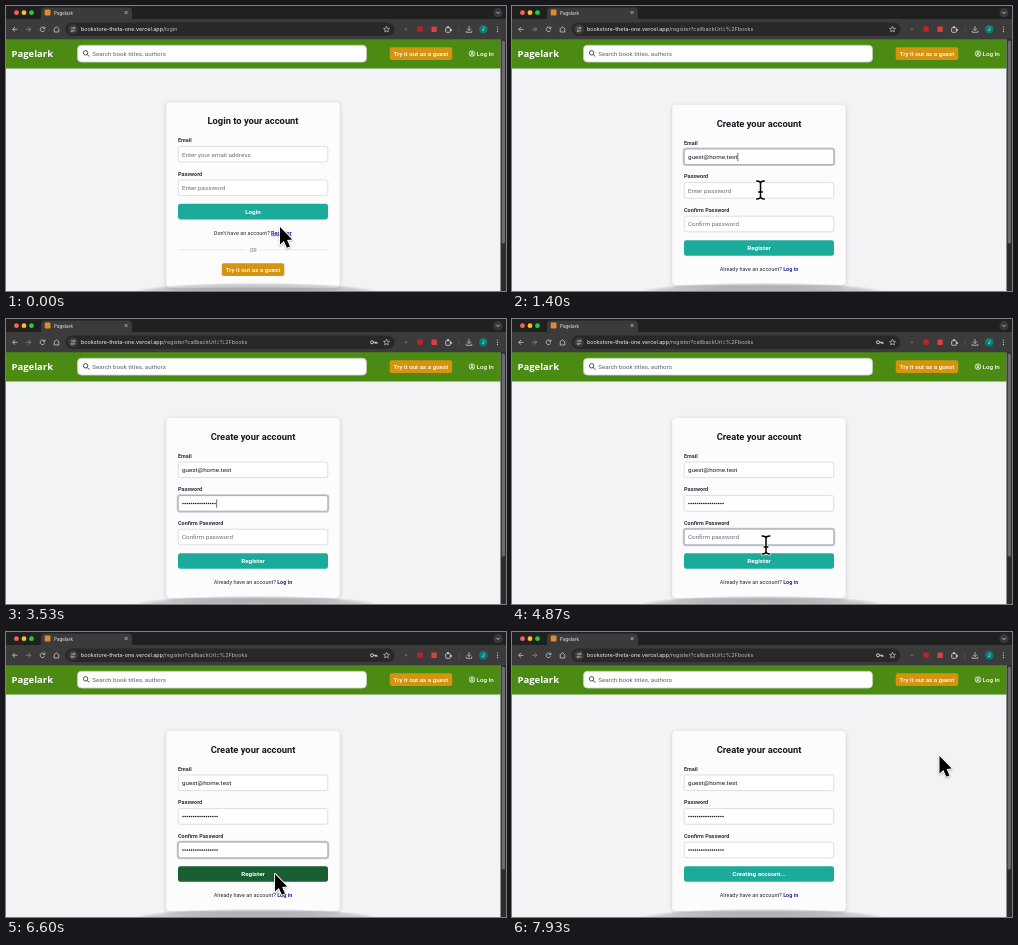
These frames come from a looping animation (500 px wide and 285 px high, 8000 ms). An HTML page with a canvas:

```html
<!DOCTYPE html>
<html lang="en">
<head>
<meta charset="utf-8">
<title>Sign-up demo</title>
<style>
  html, body { margin: 0; width: 100%; height: 100%; overflow: hidden; background: #f2f3f5; }
  canvas { display: block; width: 500px; height: 285px; }
</style>
</head>
<body>
<canvas id="stage"></canvas>
<script>
const W = 500, H = 285, LOOP = 8000;
const canvas = document.getElementById('stage');
const c = canvas.getContext('2d');
const dpr = Math.max(1, window.devicePixelRatio || 1);
canvas.width = W * dpr;
canvas.height = H * dpr;

const UI = 'Inter, "Open Sans", sans-serif';
const PAGE = 'Roboto, "Open Sans", sans-serif';
const BRAND = 'Pagelark';
const EMAIL = 'guest@home.test';
const HOST = 'bookstore-theta-one.vercel.app';
const REGISTER_PATH = '/register?callbackUrl=%2Fbooks';
const MID = 247, DOTS = 17;
const TEAL = '#1caa9b', AMBER = '#d4940f', LINK = '#252a9b', INK = '#14181f';

const T = {
  statusOn: 130, page: 730, email: [820, 1290],
  focusPass: 1530, pass: [1950, 3620],
  focusConfirm: 4560, confirm: [5000, 6060],
  submit: 6720
};

// Pointer keys: time, x, y
const PATH = [
  [0, 274, 221], [120, 274, 221], [480, 251, 151], [1000, 251, 151],
  [1340, 248.5, 184], [3720, 248.5, 184], [4300, 254, 226],
  [6080, 254, 226], [6420, 269, 242], [6920, 269, 242], [7640, 427.5, 124]
];
const HIDDEN = [[T.email[0], 1180], [T.pass[0], 3720], [T.confirm[0], 6090]];

const ramp = (t, [a, b]) => Math.min(1, Math.max(0, (t - a) / (b - a)));
const smooth = p => p * p * (3 - 2 * p);

function pointerAt(t) {
  const next = PATH.findIndex(k => k[0] > t);
  if (next < 0) return PATH[PATH.length - 1].slice(1);
  const a = PATH[next - 1], b = PATH[next];
  const p = smooth(ramp(t, [a[0], b[0]]));
  return [a[1] + (b[1] - a[1]) * p, a[2] + (b[2] - a[2]) * p];
}

function box(x, y, w, h, r, fill, stroke, lw = 0.6) {
  c.beginPath();
  c.roundRect(x, y, w, h, r);
  if (fill) { c.fillStyle = fill; c.fill(); }
  if (stroke) { c.strokeStyle = stroke; c.lineWidth = lw; c.stroke(); }
}

function disc(x, y, r, fill) {
  c.beginPath();
  c.arc(x, y, r, 0, Math.PI * 2);
  c.fillStyle = fill;
  c.fill();
}

function ring(x, y, r, color, lw = 0.8, from = 0, to = Math.PI * 2) {
  c.beginPath();
  c.arc(x, y, r, from, to);
  c.strokeStyle = color;
  c.lineWidth = lw;
  c.stroke();
}

function line(color, lw, ...p) {
  c.beginPath();
  c.moveTo(p[0], p[1]);
  for (let i = 2; i < p.length; i += 2) c.lineTo(p[i], p[i + 1]);
  c.strokeStyle = color;
  c.lineWidth = lw;
  c.stroke();
}

function text(s, x, y, size, color, { weight = 400, font = PAGE, align = 'left' } = {}) {
  c.font = `${weight} ${size}px ${font}`;
  c.textAlign = align;
  c.fillStyle = color;
  c.fillText(s, x, y);
  return c.measureText(s).width;
}

function drawTabs() {
  box(0, 0, W, 14, 0, '#1f2020');
  ['#ff5f57', '#febc2e', '#28c840'].forEach((col, i) => disc(10.5 + i * 7.5, 6.7, 2.4, col));
  box(35, 1.5, 91, 14, [4, 4, 0, 0], '#3b3b3b');
  box(38.7, 3.6, 5.8, 5.8, 1, '#e08a2c');
  text(BRAND, 48, 8.5, 4.6, '#e6e6e6', { font: UI });
  line('#d0d0d0', 0.7, 118.6, 5, 121.6, 8);
  line('#d0d0d0', 0.7, 121.6, 5, 118.6, 8);
  disc(492, 6.7, 4.6, '#39393a');
  line('#dddddd', 0.8, 490.3, 5.9, 492, 7.6, 493.7, 5.9);
}

function drawToolbar(t) {
  const icon = '#c9c9c9';
  box(0, 13, W, 20.2, 0, '#3b3b3b');
  line(icon, 0.8, 11.5, 23.3, 6.7, 23.3);
  line(icon, 0.8, 9, 21, 6.7, 23.3, 9, 25.6);
  line('#8b8b8b', 0.8, 20, 23.3, 24.8, 23.3);
  line('#8b8b8b', 0.8, 22.5, 21, 24.8, 23.3, 22.5, 25.6);
  ring(36.5, 23.3, 2.3, icon, 0.8, 0.4, 5.6);
  line(icon, 0.8, 38.9, 20.6, 38.9, 22.6, 36.9, 22.6);
  line(icon, 0.8, 48.2, 26, 48.2, 22.7, 50.5, 20.8, 52.8, 22.7, 52.8, 26, 48.2, 26);

  box(59.5, 16.5, 329, 13.6, 6.8, '#282828');
  disc(67, 23.3, 5, '#3a3a3a');
  line(icon, 0.7, 64.8, 22, 67, 22);
  ring(68.2, 22, 0.9, icon, 0.7);
  line(icon, 0.7, 67.2, 24.8, 69.4, 24.8);
  ring(66, 24.8, 0.9, icon, 0.7);
  const w = text(HOST, 75, 25.3, 5.45, '#f0f0f0', { font: UI });
  text(t < T.page ? '/login' : REGISTER_PATH, 75 + w, 25.3, 5.45, '#b9b9b9', { font: UI });

  if (t > T.pass[0] + 100) {
    ring(366, 23.3, 1.5, '#e0e0e0', 0.9);
    line('#e0e0e0', 0.9, 367.5, 23.3, 371, 23.3, 371, 25);
    line('#e0e0e0', 0.9, 369.4, 23.3, 369.4, 24.8);
  }

  c.beginPath();
  for (let i = 0; i < 10; i++) {
    const a = -Math.PI / 2 + i * Math.PI / 5, r = i % 2 ? 1.4 : 3.1;
    c.lineTo(380.5 + r * Math.cos(a), 23.4 + r * Math.sin(a));
  }
  c.closePath();
  c.strokeStyle = icon;
  c.lineWidth = 0.7;
  c.stroke();

  disc(400, 23.3, 1.3, '#6b5a52');
  box(411.4, 20.4, 5.4, 5.4, 0.8, '#c32026');
  box(425.4, 20.6, 5.4, 5.4, 0.8, '#dc3f3f');
  box(439.7, 21.7, 4.6, 4.6, 0.7, null, icon, 0.9);
  disc(442, 21, 1.1, icon);
  disc(445, 24, 1.1, icon);
  line('#5b5b5b', 0.6, 453, 20, 453, 26.6);
  line(icon, 0.8, 463, 20, 463, 24.4);
  line(icon, 0.8, 461, 22.6, 463, 24.6, 465, 22.6);
  line(icon, 0.8, 460.2, 24.8, 460.2, 26.3, 465.8, 26.3, 465.8, 24.8);
  disc(477.3, 23.3, 4.2, '#087f78');
  text('J', 477.3, 25.1, 5, '#e9f5f4', { font: UI, align: 'center' });
  for (let i = -1; i < 2; i++) disc(491.5, 23.3 + i * 2.2, 0.65, icon);
}

function guestButton(x, y) {
  box(x, y, 62.5, 12.6, 2, AMBER);
  text('Try it out as a guest', x + 31.2, y + 8.6, 6.2, '#ffffff', { weight: 500, align: 'center' });
}

function drawHeader() {
  box(0, 33, 494.5, 29.6, 0, '#4b8a13');
  text(BRAND, 5.5, 51.2, 9.5, '#ffffff', { weight: 700, font: '"Open Sans", "Noto Sans", sans-serif' });
  box(71.5, 39.3, 289, 16.8, 4, '#ffffff', '#c5cfba', 0.8);
  ring(79.6, 46.8, 2.2, '#222222', 0.8);
  line('#222222', 0.9, 81.2, 48.5, 83.2, 50.5);
  text('Search book titles, authors', 86.2, 49.8, 6.25, '#5d626b');
  guestButton(383.7, 41.3);
  ring(466, 47.6, 2.8, '#ffffff', 0.7);
  ring(466, 46.8, 1, '#ffffff', 0.7);
  ring(466, 50, 1.7, '#ffffff', 0.7, Math.PI, Math.PI * 2);
  text('Log In', 470.5, 49.8, 6.25, '#ffffff', { weight: 500 });
}

function drawScrollbar() {
  box(494.5, 33, 5.5, H - 33, 0, '#2c2c2c');
  box(495.7, 34.5, 3.3, 203, 1.6, '#6b6b6b');
}

function drawCard(y, h, title) {
  c.save();
  c.shadowColor = 'rgba(0,0,0,0.16)';
  c.shadowBlur = 4 * dpr;
  c.shadowOffsetY = 1.2 * dpr;
  box(160, y, 174, h, 4, '#fcfcfd');
  c.restore();
  box(160, y, 174, h, 4, null, '#e1e3e7', 0.5);
  text(title, MID, y + 22.2, 9.37, INK, { weight: 700, align: 'center' });
}

// Returns the x where a caret would stand.
function drawValue(value, y) {
  if (typeof value === 'string') return 176 + text(value, 176, y + 10.3, 6.25, '#15171b');
  for (let i = 0; i < value; i++) disc(177 + i * 2.13, y + 8.1, 0.78, '#15171b');
  return 176 + value * 2.13;
}

function drawField(label, hint, y, value, focused, caret) {
  text(label, 172, y - 4.2, 5.47, '#2b323d', { weight: 600 });
  if (focused) box(171.4, y - 0.6, 151.2, 17.2, 2.6, null, 'rgba(135,142,165,0.45)', 1.3);
  box(172.2, y + 0.2, 149.6, 15.6, 2, '#ffffff', focused ? '#858b9b' : '#cfd2d8', 0.7);
  let x = 176;
  if (value) x = drawValue(value, y);
  else text(hint, 176, y + 10.3, 6.25, '#686e78');
  if (focused && caret) line('#111111', 0.6, x + 0.6, y + 4, x + 0.6, y + 12.3);
}

function drawButton(label, y, color) {
  box(172, y, 150, 15.6, 2.4, color);
  text(label, MID, y + 10, 6.25, '#ffffff', { weight: 700, align: 'center' });
}

function drawPrompt(question, link, y, underline) {
  const w = text(question + ' ', 207.8, y, 5.47, '#252a33');
  const lw = text(link, 207.8 + w, y, 5.47, LINK, { weight: 600 });
  if (underline) line(LINK, 0.6, 207.8 + w, y + 1, 207.8 + w + lw, y + 1);
}

function drawLogin(py) {
  drawCard(96, 186, 'Login to your account');
  drawField('Email', 'Enter your email address', 140.2);
  drawField('Password', 'Enter password', 173.8);
  drawButton('Login', 197.8, TEAL);
  drawPrompt("Don't have an account?", 'Register', 228.6, py > 215);
  c.setLineDash([1, 0.6]);
  line('#cccfd4', 0.6, 172, 243.8, 240, 243.8);
  line('#cccfd4', 0.6, 254, 243.8, 322, 243.8);
  c.setLineDash([]);
  text('OR', MID, 245.8, 5.47, '#717680', { align: 'center' });
  guestButton(215.8, 257.3);
}

function drawRegister(t, [px, py]) {
  const busy = t >= T.submit;
  const typed = span => Math.floor(ramp(t, span) * DOTS);
  const blink = from => t - from < 500 || Math.floor((t - from) / 500) % 2 === 0;
  const mail = EMAIL.slice(0, Math.floor(ramp(t, T.email) * EMAIL.length));
  const focus = busy ? 0 : t < T.email[0] - 40 ? 0 : t < T.focusPass ? 1 : t < T.focusConfirm ? 2 : 3;

  drawCard(98.6, 180.6, 'Create your account');
  drawField('Email', 'Enter your email address', 142.8, mail, focus === 1, true);
  drawField('Password', 'Enter password', 176.4, typed(T.pass), focus === 2,
    t < T.pass[1] || blink(T.pass[1]));
  drawField('Confirm Password', 'Confirm password', 210, typed(T.confirm), focus === 3,
    t > T.confirm[0] && t < T.confirm[1] + 400);
  const hover = t > 6090 && px < 322 && py > 234 && py < 250;
  drawButton(busy ? 'Creating account...' : 'Register', 234.2, hover && !busy ? '#175e32' : TEAL);
  drawPrompt('Already have an account?', 'Log in', 265.1);
}

function drawDockShade() {
  c.save();
  c.beginPath();
  c.rect(0, 276, 494.5, 9);
  c.clip();
  c.translate(MID + 3, 286);
  c.scale(1, 0.075);
  const g = c.createRadialGradient(0, 0, 60, 0, 0, 124);
  g.addColorStop(0, 'rgba(60,60,64,0.32)');
  g.addColorStop(0.7, 'rgba(60,60,64,0.2)');
  g.addColorStop(1, 'rgba(60,60,64,0)');
  c.fillStyle = g;
  c.fillRect(-130, -130, 260, 130);
  c.restore();
}

function drawStatus() {
  box(0, 277.8, 162, 7.2, [0, 2, 0, 0], '#3a3b3d');
  text('https://' + HOST + REGISTER_PATH, 1.5, 283.3, 4.65, '#d5d6d8', { font: UI });
}

function drawArrow(x, y) {
  const shape = [0, 0, 0, 17.6, 3.9, 14, 6.8, 20.8, 10, 19.4, 7.1, 12.9, 12.2, 12.6];
  c.save();
  c.translate(x, y);
  c.beginPath();
  for (let i = 0; i < shape.length; i += 2) c.lineTo(shape[i], shape[i + 1]);
  c.closePath();
  c.lineJoin = 'round';
  c.shadowColor = 'rgba(0,0,0,0.3)';
  c.shadowBlur = 2 * dpr;
  c.shadowOffsetY = dpr;
  c.strokeStyle = '#ffffff';
  c.lineWidth = 1.8;
  c.stroke();
  c.shadowColor = 'transparent';
  c.fillStyle = '#000000';
  c.fill();
  c.restore();
}

function drawBeam(x, y) {
  const stem = (color, lw) => {
    c.beginPath();
    for (const s of [-1, 1]) {
      c.moveTo(x - 3.8, y + 9 * s);
      c.quadraticCurveTo(x, y + 9 * s, x, y + 6.6 * s);
      c.quadraticCurveTo(x, y + 9 * s, x + 3.8, y + 9 * s);
    }
    c.moveTo(x, y - 7.5);
    c.lineTo(x, y + 7.5);
    c.moveTo(x - 1.9, y + 2);
    c.lineTo(x + 1.9, y + 2);
    c.strokeStyle = color;
    c.lineWidth = lw;
    c.stroke();
  };
  c.save();
  c.lineCap = 'round';
  stem('rgba(255,255,255,0.9)', 3);
  stem('#000000', 1.5);
  c.restore();
}

function drawPointer(t, [x, y]) {
  if (HIDDEN.some(([a, b]) => t >= a && t < b)) return;
  const overField = (t > 330 && t < 6090) && y < 234;
  (overField ? drawBeam : drawArrow)(x, y);
}

function draw(t) {
  const pos = pointerAt(t);
  const status = t >= T.statusOn && t < T.page;
  c.setTransform(dpr, 0, 0, dpr, 0, 0);
  c.textBaseline = 'alphabetic';
  box(0, 0, W, H, 0, '#f2f3f5');
  if (t < T.page) drawLogin(pos[1]);
  else drawRegister(t, pos);
  if (status) drawStatus();
  else drawDockShade();
  drawHeader();
  drawScrollbar();
  drawTabs();
  drawToolbar(t);
  drawPointer(t, pos);
}

const start = performance.now();
function tick() {
  draw((performance.now() - start) % LOOP);
  requestAnimationFrame(tick);
}
tick();
</script>
</body>
</html>
```
